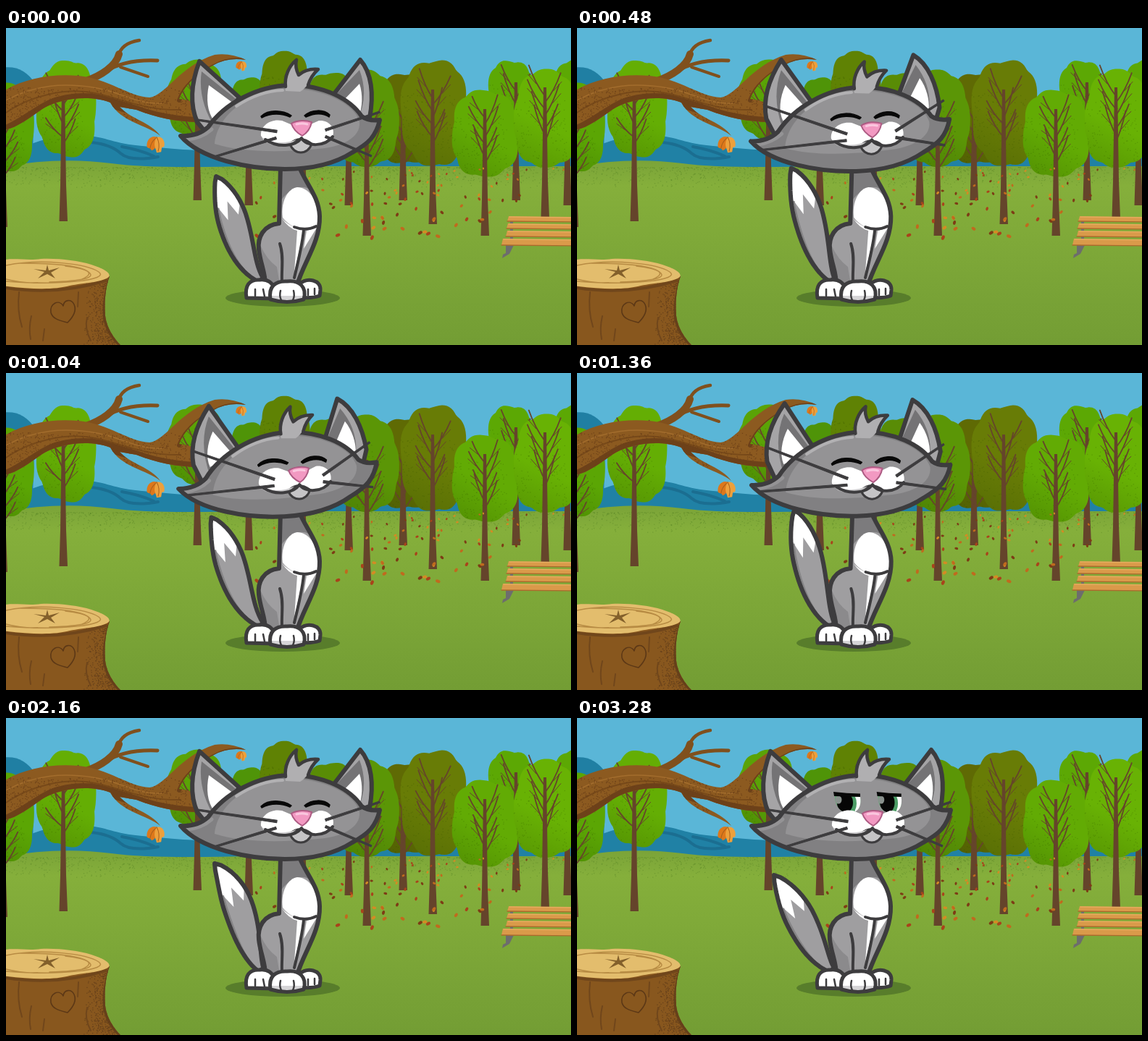
Animation of 780 by 438 pixels, one loop 3360 ms. Source, as an HTML page with a canvas:

```html
<!DOCTYPE html>
<html lang="en">
<head>
<meta charset="utf-8">
<title>Cat in the park</title>
<style>
html, body { margin: 0; width: 100%; height: 100%; overflow: hidden; background: #5ab6d7; }
canvas { display: block; width: 780px; height: 438px; }
</style>
</head>
<body>
<canvas id="stage" width="780" height="438"></canvas>
<script>
const W = 780, H = 438, LOOP = 3360, STEP = 80;
const INK = '#3d3c3e', WHITE = '#ffffff';
const screen = document.getElementById('stage').getContext('2d');
const scenery = document.createElement('canvas');
scenery.width = W;
scenery.height = H;
let g = scenery.getContext('2d');

let seed = 11;
const rnd = () => (seed = (seed * 16807) % 2147483647) / 2147483647;

function shape(d, fill, stroke, width = 6) {
  const p = typeof d === 'string' ? new Path2D(d) : d;
  if (fill) { g.fillStyle = fill; g.fill(p); }
  if (stroke) { g.strokeStyle = stroke; g.lineWidth = width; g.stroke(p); }
}
const line = (d, color, width) => shape(d, null, color, width);

function oval(x, y, rx, ry, fill, turn = 0) {
  g.beginPath();
  g.ellipse(x, y, rx, ry, turn, 0, 7);
  g.fillStyle = fill;
  g.fill();
}

function inside(d, draw) {
  g.save();
  g.clip(typeof d === 'string' ? new Path2D(d) : d);
  draw();
  g.restore();
}

function speckle(n, color, place) {
  g.fillStyle = color;
  for (let i = 0; i < n; i++) {
    const [x, y] = place();
    g.fillRect(x, y, 1.2, 1.2);
  }
}

// ---------- scenery ----------
// crown x, y, rx, ry, colour, trunk x, trunk foot, trunk top
const TREES = [
  [262, 99, 40, 56, '#5aa306', 264, 238, 88],
  [337, 120, 32, 52, '#4f9408', 335, 245, 110],
  [385, 85, 35, 55, '#5f8204', 409, 225, 100],
  [450, 110, 38, 50, '#598c06', 473, 245, 110],
  [553, 126, 46, 64, '#5f6a04', 548, 238, 115],
  [697, 97, 33, 54, '#5ca804', 704, 238, 75],
  [790, 95, 38, 52, '#5ca804', 775, 245, 90],
  [498, 126, 45, 68, '#5b9606', 498, 287, 120],
  [591, 117, 47, 75, '#687c06', 589, 271, 85],
  [662, 146, 48, 61, '#62ab04', 661, 287, 112],
  [746, 126, 46, 69, '#68b204', 744, 262, 82],
  [2, 137, 38, 62, '#5ba604', -4, 275, 130],
  [84, 112, 42, 68, '#64ae04', 79, 267, 85]
];

function crown(x, y, rx, ry, color) {
  const p = new Path2D();
  const full = v => Math.sign(v) * Math.abs(v) ** .82;
  for (let i = 0; i < 90; i++) {
    const a = i / 90 * Math.PI * 2;
    const k = .93 + .06 * Math.abs(Math.sin(4 * a + x)) + .02 * Math.sin(3 * a + y);
    p.lineTo(x + rx * k * full(Math.cos(a)), y + ry * k * full(Math.sin(a)));
  }
  p.closePath();
  shape(p, color);
  inside(p, () => {
    const shade = g.createLinearGradient(x + rx * .5, y - ry * .4, x - rx * .5, y + ry);
    shade.addColorStop(.4, 'rgba(40,70,0,0)');
    shade.addColorStop(1, 'rgba(40,70,0,.24)');
    g.fillStyle = shade;
    g.fillRect(x - rx * 1.1, y - ry * 1.1, rx * 2.2, ry * 2.2);
    speckle(150, 'rgba(40,70,0,.22)', () => [x - rx + rnd() * rx * 1.6, y + (rnd() * 1.4 - .4) * ry]);
  });
}

function trunk(x, foot, top) {
  const bark = '#65442b';
  shape(`M${x - 2} ${top}L${x + 2} ${top}L${x + 4} ${foot - 50}L${x + 6} ${foot}L${x - 5.5} ${foot}L${x - 4} ${foot - 50}Z`, bark);
  for (let i = 0; i < 8; i++) {
    const s = i % 2 ? 1 : -1, y = top + 12 + i * 9, r = 13 + rnd() * 12, h = 26 + rnd() * 18;
    line(`M${x} ${y}Q${x + s * r * .6} ${y - h * .4} ${x + s * r} ${y - h}`, bark, 1.8);
    line(`M${x + s * r * .55} ${y - h * .4}l${s * 11} ${-h * .3}`, bark, 1);
  }
}

function leafPair(x, y, k) {
  g.save();
  g.translate(x, y);
  g.scale(k, k);
  shape('M1 -9C-6 -12 -14 -5 -12 5C-10 6 -7 6 -6 9C0 8 3 0 1 -9Z', '#dd781b');
  shape('M1 -9C9 -11 13 -3 11 4L8 5L7 11L1 12L0 8C-3 2 -2 -4 1 -9Z', '#eda03c');
  line('M1 -9Q6 0 3 10M0 -8Q-7 -2 -8 6', '#a9601c', 1);
  g.restore();
}

function drawBough() {
  const bough = 'M-5 88C25 70 60 63 100 66C142 70 170 95 198 96C220 94 240 52 288 37Q310 34 331 44Q306 40 287 51C264 62 246 80 239 98C255 100 272 106 276 112L274 130C240 131 208 124 180 113L157 109C172 126 200 130 213 149C195 134 158 130 144 103C115 92 75 97 50 112C30 126 12 140 -5 141Z';
  line('M108 74C132 66 152 52 156 36', '#80501d', 10);
  line('M155 40Q158 21 184 17', '#80501d', 4.5);
  line('M136 61Q163 43 209 45', '#80501d', 5);
  line('M158 54L196 67', '#80501d', 4);
  shape(bough, '#8c5a20');
  inside(bough, () => {
    line('M-5 143C12 138 30 124 50 112C75 96 115 92 146 104L182 115C208 124 240 130 274 130', '#6d4119', 14);
    line('M331 45Q306 42 287 53C262 66 246 82 239 100', '#6d4119', 6);
    line('M0 100C40 78 80 76 120 82S180 106 215 104', '#a36d2d', 1.5);
    line('M0 117C34 93 84 82 123 90S190 114 241 113', '#774919', 2);
    speckle(800, '#6d4119', () => [rnd() * 270, 82 + rnd() * 47]);
  });
  leafPair(207, 160, 1.02);
  leafPair(325, 52, .62);
}

function drawStump() {
  const side = 'M-6 338L143 343C136 362 136 385 137 398C140 418 151 431 160 440L-6 440Z';
  shape(side, '#88571e');
  inside(side, () => {
    line('M145 340C136 370 135 392 137 404Q143 426 160 440', '#66401b', 5);
    speckle(600, '#66401b', () => [105 + rnd() ** .5 * 45, 350 + rnd() * 88]);
    line('M0 359Q70 370 138 349', '#70461b', 4);
    line('M18 365Q15 390 22 413M35 398Q31 415 34 430M100 365L99 385M112 400Q108 415 117 432M53 416L51 432', '#70461b', 2);
  });
  shape('M-6 321C10 317 30 322 48 319C72 318 98 321 118 327C130 331 146 337 142 344C130 352 108 352 88 356C66 362 34 361 -6 356Z', '#e3bd6d');
  line('M0 328C50 318 112 326 128 337S78 356 0 350M20 325Q98 325 114 337T60 351M-4 346Q21 353 44 352M82 329Q132 335 105 347', '#b78b43', 1.5);
  shape('M57 327L59 335L74 331L62 338L68 346L57 340L44 346L53 337L38 333L55 335Z', '#83602b');
  line('M79 384C73 374 60 381 62 393C64 403 78 405 85 407C91 401 98 391 94 382C90 374 80 375 79 384', '#5c3816', 1.6);
}

function drawBench() {
  shape('M690 300L701 300L695 312L685 318L686 313L690 311Z', '#6d6d6d');
  shape('M696 260h4v32h-4Z', '#707070');
  for (const [x, y, h] of [[694, 260, 7], [693, 270, 7], [692, 280, 8], [686, 291, 9]]) {
    shape(`M${x} ${y}L790 ${y + 1}V${y + h + 1}L${x - 2} ${y + h}Z`, '#da9a4a');
    line(`M${x - 2} ${y + h}L790 ${y + h + 1}`, '#a96a2c', 1.3);
    line(`M${x + 1} ${y + 1}L790 ${y + 2}`, '#e9b266', 1);
  }
}

function drawScenery() {
  g.lineJoin = g.lineCap = 'round';
  g.fillStyle = '#5ab6d7';
  g.fillRect(0, 0, W, H);
  shape('M-5 55Q22 50 40 76L36 200H-5Z', '#207fa3');
  shape('M30 162C60 150 90 146 112 149C136 150 150 160 188 163S260 172 340 168S520 160 790 160V210H30Z', '#2081a5');
  line('M118 158Q145 161 158 173T210 178M160 164Q184 168 204 177', '#1b6e91', 4);
  const grass = g.createLinearGradient(0, 185, 0, H);
  grass.addColorStop(0, '#7ba438');
  grass.addColorStop(.13, '#85af3b');
  grass.addColorStop(1, '#739d34');
  shape('M-5 192C40 183 95 180 145 187S270 192 345 191H790V445H-5Z', grass);
  speckle(1200, 'rgba(80,125,35,.4)', () => [rnd() * W, 192 + rnd() ** 2 * 28]);
  TREES.forEach(([x, y, rx, ry, color, tx, foot, top]) => {
    crown(x, y, rx, ry, color);
    trunk(tx, foot, top);
  });
  for (let i = 0; i < 110; i++) {
    const d = rnd() ** 1.5, x = 345 + rnd() * (435 - d * 160), y = 194 + d * 96;
    oval(x, y, 1.6 + d * 1.8, 1.1 + d * 1.1, ['#a9431b', '#d48b24', '#7d3c15', '#c06a1e'][i % 4], rnd() * 3);
  }
  drawBough();
  drawBench();
  drawStump();
  oval(382, 373, 79, 12, '#587d2b');
}

// ---------- motion ----------
// head: turn, shift x, shift y, ear lift
const REST = [0, 0, 0, 0], TILT_LEFT = [-5.3, -2.5, 3.8, .72], TILT_RIGHT = [4.8, 6, 1, 1];
const HEAD = [
  [0, REST], [320, TILT_LEFT], [720, TILT_RIGHT], [1180, [-5.3, -2, 3.5, .9]],
  [1600, TILT_RIGHT], [1760, [.3, 1.5, .7, .5]], [1920, REST], [LOOP, REST]
];
// tail: two bend points and the tip
const RISING = [318, 318, 316, 252, 290, 205];
const SWEPT_IN = [329, 315, 328, 245, 288, 201];
const UPRIGHT = [318, 315, 313, 235, 310, 180];
const SWEPT_OUT = [299, 315, 299, 250, 279, 198];
const LOW = [324, 325, 309, 265, 272, 217];
const TAIL = [
  [0, RISING], [320, SWEPT_IN], [720, UPRIGHT], [920, SWEPT_OUT],
  [1160, SWEPT_IN], [1540, UPRIGHT], [1760, SWEPT_OUT], [2160, SWEPT_IN],
  [2720, [318, 320, 315, 258, 286, 210]], [3280, LOW], [LOOP, RISING]
];
const EYES_OPEN = 2400;

function pose(keys, t) {
  const i = keys.findIndex(key => key[0] > t);
  const [t0, a] = keys[i - 1], [t1, b] = keys[i];
  const u = (t - t0) / (t1 - t0), k = u * u * (3 - 2 * u);
  return a.map((v, n) => v + (b[n] - v) * k);
}

function turned(x, y, deg, draw) {
  g.save();
  g.translate(x, y);
  g.rotate(deg * Math.PI / 180);
  g.translate(-x, -y);
  draw();
  g.restore();
}

// ---------- cat ----------
function drawTail([ax, ay, bx, by, tx, ty]) {
  const at = (u, s) => {
    const v = 1 - u;
    const mix = (p, a, b, q) => v * v * v * p + 3 * v * v * u * a + 3 * v * u * u * b + u * u * u * q;
    const slope = (p, a, b, q) => v * v * (a - p) + 2 * v * u * (b - a) + u * u * (q - b);
    const dx = slope(352, ax, bx, tx), dy = slope(348, ay, by, ty), len = Math.hypot(dx, dy);
    const w = u < .6 ? 4 + 16 * Math.sin(u / .6 * Math.PI / 2)
                     : 20 * Math.max(0, Math.cos((u - .6) / .4 * Math.PI / 2)) ** .75;
    return [mix(352, ax, bx, tx) + dy / len * w * s, mix(348, ay, by, ty) - dx / len * w * s];
  };
  const poly = list => {
    const p = new Path2D();
    list.forEach(([u, s]) => p.lineTo(...at(u, s)));
    p.closePath();
    return p;
  };
  const run = (a, b, s) => Array.from({ length: 25 }, (_, i) => [a + (b - a) * i / 24, s]);
  const whole = poly([...run(0, 1, 1), ...run(1, 0, -1)]);
  shape(whole, '#9f9ea0');
  shape(poly([...run(.78, 1, 1), ...run(1, .74, -1), [.64, -.5], [.77, -.05], [.62, .3]]), WHITE);
  shape(poly([...run(0, .74, 1), ...run(.74, 0, .72)]), '#858486');
  shape(whole, null, INK, 6);
}

function drawBody(lean) {
  const k = lean / 145;
  const body = 'M379 190L377 270C355 272 347 290 349 306C351 325 358 337 358 355L402 355C410 325 434 296 433 260C432 232 413 214 404 190Z';
  g.save();
  g.transform(1, 0, -k, 1, k * 345, 0);
  shape(body, '#9f9ea0');
  inside(body, () => {
    shape('M375 190H406L418 222Q398 213 378 240Z', '#7c7b7d');
    shape('M382 262C379 242 388 222 402 220C418 220 432 240 434 262L430 275Q414 281 398 275Q388 270 382 262Z', WHITE);
    shape('M381 263Q388 271 398 275L411 279L398 338L402 280Q390 277 381 263Z', WHITE);
    shape('M415 280L429 276L411 305Z', WHITE);
    shape('M358 355C358 333 350 320 351 300Q360 320 374 330L378 355Z', '#8b8a8c');
  });
  line('M398 275Q414 281 428 274M411 279Q409 300 398 345', INK, 4);
  line('M378 298C384 315 380 335 381 350', INK, 4);
  shape(body, null, INK, 6);
  g.restore();
  drawPaw('M332 373C329 356 336 347 350 348Q365 346 371 360L370 374Z', 'M344 361V370M355 361L357 371');
  drawPaw('M404 372L405 354C416 344 435 348 434 362L433 370Q422 374 404 372Z', 'M417 361V369M426 360V368');
  drawPaw('M365 375C362 357 372 349 388 350C405 348 416 358 411 375Q388 382 365 375Z', 'M379 363Q377 370 380 376M397 363Q399 370 396 376');
}

function drawPaw(d, toes) {
  shape(d, WHITE);
  inside(d, () => {
    g.fillStyle = '#d6d5d7';
    g.fillRect(325, 370, 115, 14);
  });
  shape(d, null, INK, 5);
  line(toes, INK, 2.5);
}

function drawEye() {
  const eye = 'M356 106L391 109C393 122 388 131 377 131C364 132 355 121 356 106Z';
  shape(eye, '#69a578');
  inside(eye, () => {
    oval(389, 119, 8, 13, WHITE);
    oval(379, 118, 7, 13, '#4c9d66');
    oval(370, 117, 11, 14, '#060606');
    oval(361, 113, 4.5, 5.5, '#89918d');
  });
  shape('M354 102Q372 104 391 104.5L391 109L355 108Z', '#070707');
}

function drawFace(open, lift) {
  if (open) {
    drawEye();
    g.save();
    g.translate(88, 0);
    g.scale(.92, 1);
    drawEye();
    g.restore();
  } else {
    shape('M352 122C362 112 382 113 394 121L392 123C381 118 366 117 353 124Z', '#080808', '#080808', 1.5);
    shape('M412 121C422 112 439 112 447 120L446 123C437 117 425 118 414 123Z', '#080808', '#080808', 1.5);
  }
  shape('M352 149C351 135 365 125 381 128L407 139L432 128C446 127 455 138 451 150C446 163 420 163 408 153C396 165 362 166 352 149Z', WHITE);
  shape('M392 160Q406 147 422 160C417 176 397 176 392 160Z', '#c5c4c6', INK, 3);
  shape('M353 151Q376 164 401 154Q390 165 372 162Q357 160 353 151Z', '#cccbcd');
  line('M358 154C375 166 399 164 408 152C414 164 440 165 451 150', INK, 4);
  shape('M394 132C402 127 414 127 422 130C420 140 414 146 409 149C402 145 396 139 394 132Z', '#f299c2', '#ad5b83', 2);
  line('M401 133Q409 131 416 133', '#fac7df', 3);

  const whisker = (x, y, angle, len) => turned(x, y, angle, () =>
    shape(`M${x} ${y - 1.7}L${x + len} ${y - 1.2}V${y + 1.2}L${x} ${y + 1.7}Z`, INK, INK, 1));
  const k = 15 * lift;
  whisker(374, 143, 188.3 + k, 110 + 11 * lift);
  whisker(373, 152, 163 + k, 87 + 35 * lift);
  whisker(441, 141, -18.4 - k, 79);
  whisker(441, 150, 23 - k, 69);
}

function drawEar(d, inner, shade, x, y, angle) {
  turned(x, y, angle, () => {
    shape(d, '#a5a4a6');
    inside(d, () => {
      shape(shade, '#747375');
      shape(inner, WHITE);
    });
    shape(d, null, INK, 6);
  });
}

function drawEars(lift) {
  g.save();
  g.translate(0, -9 * lift);
  drawEar('M267 46C258 70 252 102 264 130L282 152L322 96Z',
    'M280 79C276 98 278 116 287 128L314 104Z', 'M270 60L326 105L290 140Q264 100 270 60Z', 280, 125, 17 * lift);
  drawEar('M489 44C505 62 508 92 502 124L490 142L449 96Z',
    'M488 77C493 92 492 110 487 122L464 102Z', 'M488 58L446 102L484 130Q502 95 488 58Z', 480, 118, -19 * lift);
  g.restore();
}

function drawHead([turn, dx, dy, lift], open) {
  const skull = 'M241 149C256 150 269 146 279 137C302 104 347 80 392 79C440 79 476 99 491 122C499 128 508 128 516 127C511 150 500 160 478 172C450 190 415 195 385 195C335 195 268 181 241 149Z';
  g.save();
  g.translate(dx, dy);
  turned(390, 200, turn, () => {
    drawEars(lift);
    shape(skull, '#818082');
    inside(skull, () => {
      shape('M288 160C292 118 340 84 392 84C440 84 482 105 488 130C490 152 462 165 430 167C380 172 325 172 288 160Z', '#949395');
      line('M318 108Q350 87 382 86', '#b2b1b3', 4);
      line('M250 154Q270 152 284 140', '#949395', 5);
    });
    shape(skull, null, INK, 6);
    const tuft = 'M386 87C383 69 391 52 401 44C399 52 401 59 404 65C411 59 420 56 431 57C420 65 420 80 406 88';
    shape(tuft, '#b0afb1');
    line('M386 81C384 67 391 52 401 44C399 52 401 59 404 65C411 59 420 56 431 57Q421 66 417 79', INK, 4.5);
    drawFace(open, lift);
  });
  g.restore();
}

function draw(now) {
  const t = Math.floor(Math.max(0, now) % LOOP / STEP) * STEP;
  const head = pose(HEAD, t);
  g.drawImage(scenery, 0, 0);
  drawTail(pose(TAIL, t));
  drawBody(Math.max(0, head[1]));
  drawHead(head, t >= EYES_OPEN);
}

drawScenery();
g = screen;
g.lineJoin = 'round';
g.lineCap = 'round';
const start = performance.now();
function tick() {
  draw(performance.now() - start);
  requestAnimationFrame(tick);
}
tick();
</script>
</body>
</html>
```
